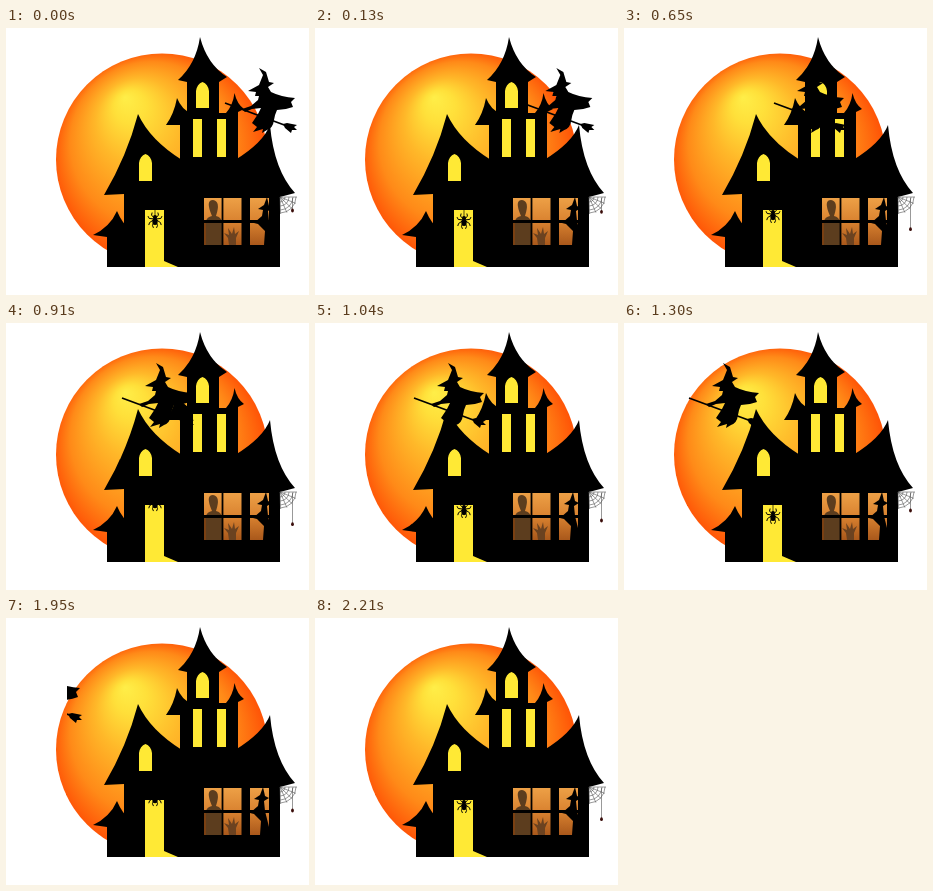
An HTML page for the animation above (2340 ms loop, 303 by 267 pixels).

```html
<!DOCTYPE html>
<html lang="en">
<head>
<meta charset="utf-8">
<title>Haunted house</title>
<style>
  html, body { margin: 0; width: 100%; height: 100%; overflow: hidden; background: #fff; }
  svg { display: block; width: 303px; height: 267px; }
  .lit { fill: #ffe935; }
  .line { fill: none; stroke: #000; }
</style>
</head>
<body>
<svg viewBox="0 0 303 267">
  <defs>
    <radialGradient id="glow" gradientUnits="userSpaceOnUse" cx="154" cy="130" r="108" fx="119" fy="69">
      <stop offset="0" stop-color="#ffee48"/>
      <stop offset=".15" stop-color="#ffe03a"/>
      <stop offset=".4" stop-color="#ffb829"/>
      <stop offset=".75" stop-color="#ff8a18"/>
      <stop offset="1" stop-color="#ff5206"/>
    </radialGradient>
    <linearGradient id="room" x1="0" y1="0" x2="0" y2="1">
      <stop offset="0" stop-color="#eda046"/>
      <stop offset=".5" stop-color="#d98230"/>
      <stop offset="1" stop-color="#a9581b"/>
    </linearGradient>
    <clipPath id="sky"><path d="M61 0H303V267H61Z"/></clipPath>
    <clipPath id="door"><path d="M139 182H158V239H139Z"/></clipPath>
    <clipPath id="panes"><path d="M198 170H267V217H198Z"/></clipPath>
  </defs>

  <circle cx="156" cy="131.500" r="106" fill="url(#glow)"/>

  <!-- main house, porch, tower, turrets -->
  <path d="M118 166L98 167Q121 128 132 86Q144 112 176 132H229Q257 115 264 97Q268 142 289 165L274 169V239H118Z"/>
  <path d="M101 239V209L87 207Q104 199 111 183Q116 195 125 203V239Z"/>
  <path d="M194 9Q201 36 221 49L213 54V90H181V54L172 52Q190 36 194 9Z"/>
  <path d="M171 70Q176 82 185 85H220Q227 77 228.500 65Q231 76 238 81L232 84V134H174V97H160Q168 86 171 70Z"/>

  <path class="lit" d="M190 80V63Q191 56 196.500 54Q202 56 203 63V80ZM187 91H196V129H187ZM211 91H220V129H211Z
    M133 153V135Q134 128 139.500 126Q145 128 146 135V153ZM139 182H158V233L172 239H139Z"/>

  <!-- big window -->
  <g clip-path="url(#panes)">
    <path d="M198 170H267V217H198Z" fill="url(#room)"/>
    <path d="M198 195H216V217H198Z" fill="#7a4012"/>
    <path d="M200 217V193Q201 189 206 188Q199 172 207 172Q215 173 210 188Q215 189 216 194V217Z" fill="#5c3d1e"/>
    <path d="M223 217L222 210L218 205L223 207L222 200L226 206L228 199L229 206L233 203L230 210V217Z" fill="#6b4220"/>
    <path id="guest" d="M259 169L261 178L265 180L260 183L261 193L264 205L267 217H256L257 203L250 196L246 195L254 188L255 182L250 181L256 177Z"/>
    <path d="M235.500 169H244V217H235.500ZM197 192H267V195H197ZM263 169H267V217H263Z"/>
    <path d="M216.500 169V217" class="line" stroke-width="1.800"/>
  </g>

  <!-- web and hanging spider -->
  <path id="web" fill="none" stroke="#555" stroke-width=".6"/>
  <path id="thread" fill="none" stroke="#555" stroke-width=".6"/>
  <ellipse id="dangler" rx="1.400" ry="1.900" fill="#3a0d0a"/>

  <!-- door spider -->
  <g clip-path="url(#door)">
    <g id="spider">
      <path class="line" d="M0 -20V0" stroke-width=".7"/>
      <path class="line" id="legs"/>
      <circle cy="-3" r="2"/>
      <ellipse cy="1.500" rx="2.700" ry="3.600"/>
    </g>
  </g>

  <g clip-path="url(#sky)">
    <g id="witch">
      <path class="line" d="M0 35L62 58" stroke-width="1.800"/>
      <path d="M58 56L62 55L72 57L69 59L72 62L67 62L66 65L60 60Z"/>
      <path d="M34 0L41 4L44 14L49 15L43 19L46 24Q56 29 70 30L66 34L68 39Q60 42 52 42Q50 46 49 52Q48 60 42 62L37 65L38 61
        L28 64L32 59L27 55L33 46L36 40L27 41L20 44L17 41L26 38L33 32L34 28L30 28L31 24L23 23L34 17L38 7Z"/>
    </g>
  </g>
</svg>
<script>
const STEP = 130, COUNT = 18;
const el = id => document.getElementById(id);
const move = (id, x, y) => el(id).setAttribute("transform", `translate(${x} ${y})`);
const wave = (n, period) => Math.cos(2 * Math.PI * n / period);
const polar = (r, deg) => [r * Math.cos(deg * Math.PI / 180), r * Math.sin(deg * Math.PI / 180)];

// The flight slows at the tower and near the moon's rim: [step, x].
const flight = [[0, 219], [3, 184], [10, 65], [12, 50], [15, 4]];

function flyX(n) {
  const i = Math.max(1, flight.findIndex(p => p[0] >= n));
  const [[n0, x0], [n1, x1]] = flight.slice(i - 1, i + 1);
  return x0 + (x1 - x0) * (n - n0) / (n1 - n0);
}

function buildLegs() {
  let d = "";
  for (const side of [-1, 1])
    for (let deg = -55; deg <= 65; deg += 40) {
      const [kx, ky] = polar(6, deg), [fx, fy] = polar(8, deg + Math.sign(deg) * 14);
      d += `M0 -1L${side * kx} ${ky}L${side * fx} ${fy}`;
    }
  el("legs").setAttribute("d", d);
}

function buildWeb() {
  let d = "";
  const spokes = [0, 22, 44, 66, 88];
  for (const deg of spokes) d += `M0 0L${polar(17, deg)}`;
  for (const r of [5, 9, 13, 16])
    d += "M" + spokes.map(deg => polar(r, deg)).join("L");
  el("web").setAttribute("d", d);
  move("web", 274, 169);
}

function draw(n) {
  const flying = n <= 15;
  el("witch").style.display = flying ? "" : "none";
  if (flying) move("witch", flyX(n), 40);

  // The door spider hangs low and hops up twice per loop.
  const hop = ((1 - wave(n - 2, 9)) / 2) ** 3;
  move("spider", 149, 193 - 14 * hop);

  const y = 192.5 - 10 * wave(n, 12);
  move("dangler", 286.5, y);
  el("thread").setAttribute("d", `M286.5 170V${y}`);
  move("guest", 2 * wave(n, 6), 0);
}

buildLegs();
buildWeb();
const start = performance.now();
function tick() {
  draw(Math.floor((performance.now() - start) / STEP) % COUNT);
  requestAnimationFrame(tick);
}
tick();
</script>
</body>
</html>
```
